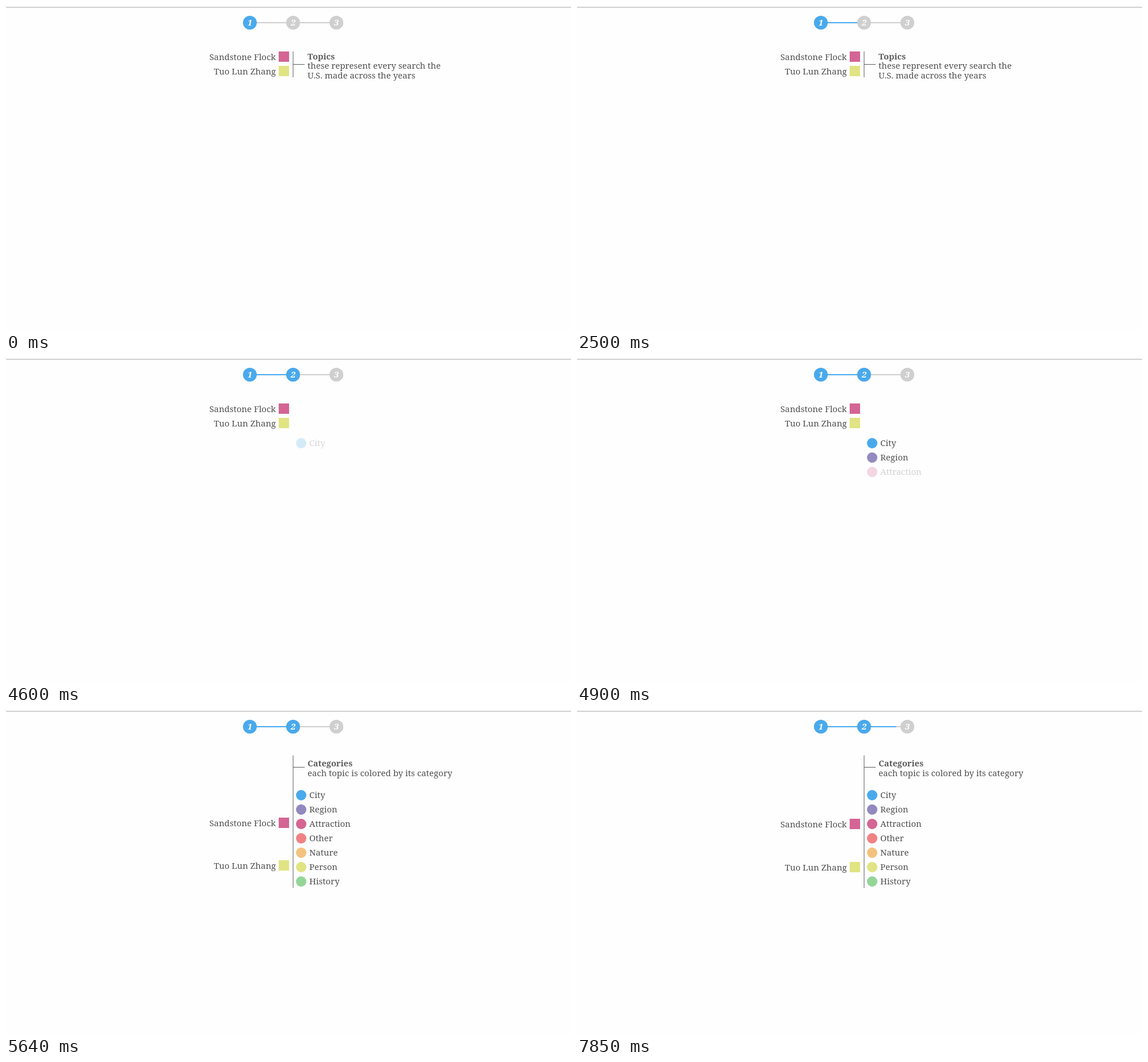
An HTML page that plays this animation: 980x563 px, repeating every 8 s.

```html
<!DOCTYPE html>
<html lang="en">
<head>
<meta charset="utf-8">
<title>Topics and categories</title>
<style>
  html, body { margin: 0; width: 100%; height: 100%; overflow: hidden; background: #fefefe; }
  svg { display: block; }
  text { font: 14.9px "Noto Serif", "Liberation Serif", serif; fill: #505050; }
  .bold { font-size: 14.6px; font-weight: 700; fill: #5c5c5c; }
  .num { font-size: 15px; font-weight: 700; font-style: italic; fill: #fff; text-anchor: middle; }
  .end { text-anchor: end; }
  .bracket { stroke: #5c5c5c; fill: none; }
</style>
</head>
<body>
<svg id="stage" width="980" height="563" viewBox="0 0 980 563">
  <rect width="980" height="2" fill="#f4f3f4"/>
  <rect y="2" width="980" height="1" fill="#bab6ba"/>
</svg>
<script>
const LOOP = 8000, BLUE = '#49a9ec', GREY = '#cfcfcf';
const stage = document.getElementById('stage');

function add(parent, tag, attrs = {}, text = '') {
  const el = document.createElementNS('http://www.w3.org/2000/svg', tag);
  for (const key in attrs) el.setAttribute(key, attrs[key]);
  el.textContent = text;
  parent.append(el);
  return el;
}
const group = () => add(stage, 'g');
const label = (parent, x, y, text, cls = '') => add(parent, 'text', { x, y, class: cls }, text);

// Stepper
function track(x) {
  add(stage, 'rect', { x, y: 28, width: 51, height: 2, fill: GREY });
  return add(stage, 'rect', { x, y: 28, width: 0, height: 2, fill: BLUE });
}
const tracks = [track(435), track(510)];
const dot = (cx, fill) => add(stage, 'circle', { cx, cy: 29, r: 12, fill });
dot(423, BLUE);
dot(498, GREY);
dot(573, GREY);
const secondDot = dot(498, BLUE);
[423, 498, 573].forEach((x, i) => label(stage, x, 34, i + 1, 'num'));

// Notes with their brackets
function note(bottom, tickY, firstLine, lines) {
  const g = group();
  add(g, 'path', { d: `M498 79V${bottom}M498 ${tickY}h20`, class: 'bracket' });
  lines.forEach((line, i) =>
    label(g, 523, Math.round(firstLine + i * 16.6), line, i ? '' : 'bold'));
  return g;
}
const topicsNote = note(124, 101.5, 92.6, [
  'Topics', 'these represent every search the', 'U.S. made across the years']);
const categoriesNote = note(309, 99.5, 98, [
  'Categories', 'each topic is colored by its category']);

// Topics that move to their categories
const topics = [
  ['Sandstone Flock', '#d46594', 79, 189],
  ['Tuo Lun Zhang', '#e1e483', 104, 264]
].map(([name, fill, from, to]) => {
  const g = group();
  add(g, 'rect', { x: 473, width: 18, height: 18, fill });
  label(g, 468, 15, name, 'end');
  return { g, from, to };
});

const categories = [
  ['City', BLUE], ['Region', '#9289bf'], ['Attraction', '#d46594'], ['Other', '#f08284'],
  ['Nature', '#f4c27f'], ['Person', '#e1e483'], ['History', '#94d698']
].map(([name, fill], i) => {
  const g = group();
  add(g, 'circle', { cx: 512, cy: 148 + 25 * i, r: 9, fill });
  label(g, 526, 153 + 25 * i, name);
  return g;
});

const ramp = (t, start, duration) => Math.min(1, Math.max(0, (t - start) / duration));
const easeOut = p => 1 - (1 - p) ** 1.35;
const cubicInOut = p => p < 0.5 ? 4 * p ** 3 : 1 - 4 * (1 - p) ** 3;
const fade = (el, alpha) => el.setAttribute('opacity', alpha);

function draw(t) {
  [80, 6030].forEach((start, i) =>
    tracks[i].setAttribute('width', 51 * easeOut(ramp(t, start, 2380))));

  const swap = ramp(t, 4208, 200);
  fade(secondDot, swap);
  fade(topicsNote, 1 - swap);
  fade(categoriesNote, ramp(t, 5320, 200));
  categories.forEach((g, i) => fade(g, ramp(t, 4556 + 147 * i, 200)));

  const move = cubicInOut(ramp(t, 5169, 566));
  for (const { g, from, to } of topics)
    g.setAttribute('transform', `translate(0 ${from + (to - from) * move})`);
}

const begin = performance.now();
function tick() {
  draw((performance.now() - begin) % LOOP);
  requestAnimationFrame(tick);
}
tick();
</script>
</body>
</html>
```
